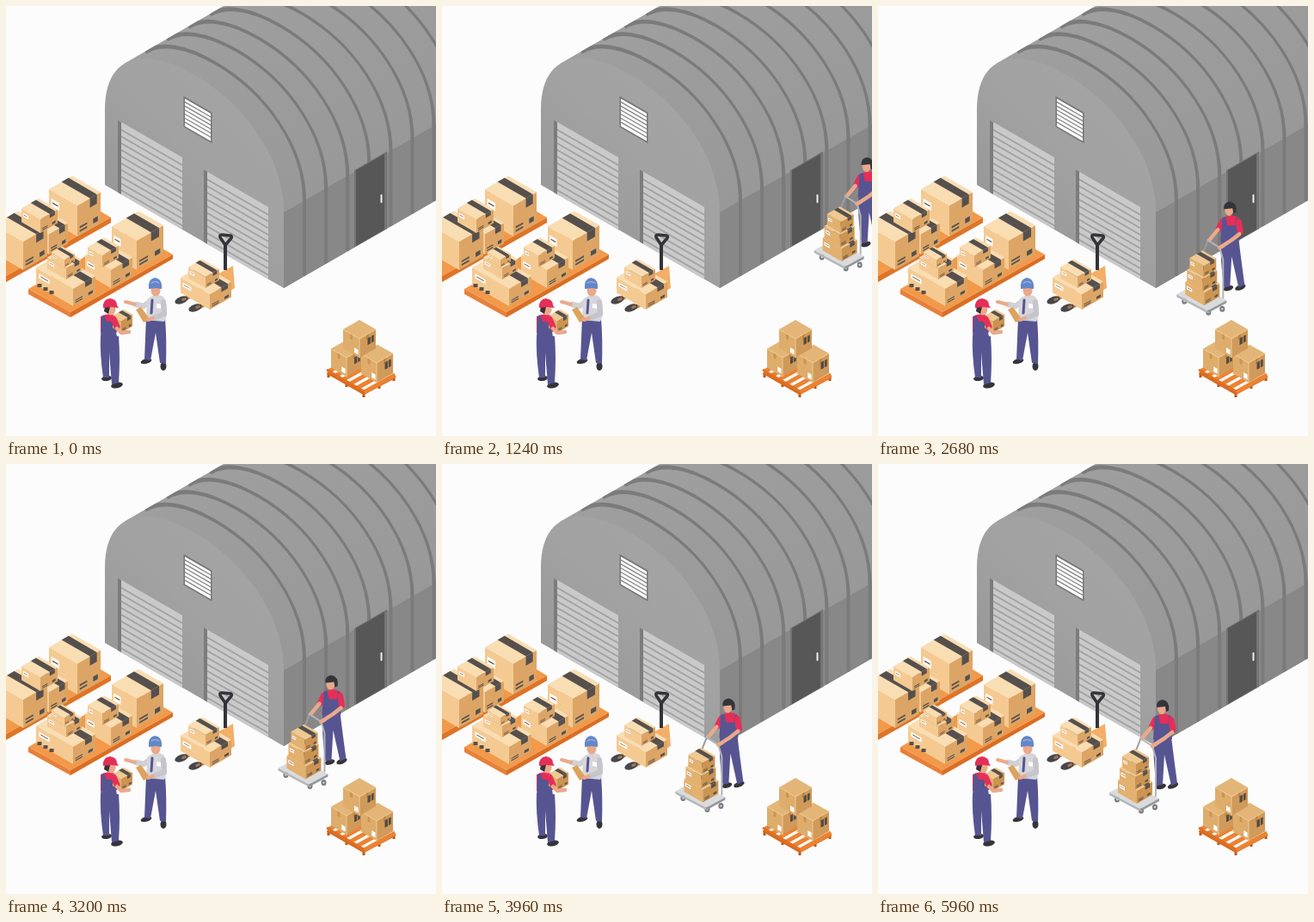
Animation, 500 px wide and 500 px high, one loop 6 s. Source, as an HTML page:

```html
<!DOCTYPE html>
<html lang="en">
<head>
<meta charset="utf-8">
<title>Warehouse</title>
<style>
html, body { margin: 0; width: 100%; height: 100%; overflow: hidden; background: #fcfcfc; }
svg { display: block; width: 100%; height: 100%; }
</style>
</head>
<body>
<svg id="stage" viewBox="0 0 500 500"></svg>
<script>
const SLOPE = 0.577;
const LOOP = 6000, TICK = 40, ARRIVE = 4000;
const KRAFT = { left: '#f4ca92', right: '#dca566', top: '#f9ddb3', tape: '#56504d' };
const TAN = { left: '#e2b06f', right: '#cb9452', top: '#eec992', tape: '#56504d' };
const BROWN = { left: '#deac6b', right: '#d09a5a', top: '#e3b678', tape: null };
const NAVY = '#565591', RED = '#e52f58', SKIN = '#eaa98b', DARK = '#35343a';

const poly = (fill, ...pts) => `<polygon fill="${fill}" points="${pts.map(p => p.join()).join(' ')}"/>`;
const shape = (fill, d) => `<path fill="${fill}" d="${d}"/>`;
const line = (color, width, d, cap = 'round') =>
  `<path fill="none" stroke="${color}" stroke-width="${width}" stroke-linecap="${cap}" stroke-linejoin="round" d="${d}"/>`;
const oval = (fill, x, y, rx, ry = rx, turn = 0) =>
  `<ellipse fill="${fill}" cx="${x}" cy="${y}" rx="${rx}" ry="${ry}" transform="rotate(${turn} ${x} ${y})"/>`;

// (x, y) is the nearest bottom corner; a runs left, b runs right, h is the height.
function box(x, y, a, b, h, c = KRAFT) {
  const at = (s, t, z) => [x - s * a + t * b, y - (s * a + t * b) * SLOPE - z * h];
  const onLeft = (fill, s0, s1, z0, z1) => poly(fill, at(s0, 0, z0), at(s1, 0, z0), at(s1, 0, z1), at(s0, 0, z1));
  const onRight = (fill, t0, t1, z0, z1) => poly(fill, at(0, t0, z0), at(0, t1, z0), at(0, t1, z1), at(0, t0, z1));
  const onTop = (fill, t0, t1) => poly(fill, at(0, t0, 1), at(1, t0, 1), at(1, t1, 1), at(0, t1, 1));
  let out = onLeft(c.left, 0, 1, 0, 1) + onRight(c.right, 0, 1, 0, 1) + onTop(c.top, 0, 1);
  if (c.tape) {
    out += onTop(c.tape, .54, .84) + onRight(c.tape, .54, .84, .7, 1)
      + onLeft('#fff', .64, .92, .48, .74) + onLeft('#6b5138', .68, .88, .6, .64)
      + onRight(c.tape, .1, .42, .1, .16) + onRight(c.tape, .1, .42, .22, .28)
      + onRight(c.tape, .68, .88, .12, .28);
  } else {
    out += onLeft('#cb9352', .42, .58, .72, 1) + onRight('#bd8443', .42, .56, .75, 1)
      + onLeft('#fff', .08, .32, .12, .38)
      + onRight('#554b40', .5, .68, .42, .78) + onRight('#554b40', .73, .88, .42, .78)
      + line('#f0c78f', 1, `M${at(1, 0, 1)}L${at(0, 0, 1)}L${at(0, 1, 1)}M${at(0, 0, 1)}L${at(0, 0, 0)}`);
  }
  return out;
}

// Front-wall coordinates: u to the right along the base, v upward (negative).
const wall = (body, shift = 0) =>
  `<g transform="matrix(1 ${SLOPE} 0 1 ${115 + shift} ${208 - shift * SLOPE})">${body}</g>`;

const ARCH_RIGHT = 'C166 -188 208 -148 208 -88V0';
const ARCH = `M0 0V-88C0 -148 42 -188 104 -188${ARCH_RIGHT}Z`;
const RIB = `M22.5 -154C41 -175.5 69 -188 104 -188${ARCH_RIGHT}`;

function shutter(u) {
  let out = shape('#c9c9c9', `M${u} 0V-84h73V0Z`);
  for (let v = -75; v < 0; v += 7.8) out += line('#a0a0a0', 2, `M${u} ${v}h73`, 'butt');
  return out + shape('#7c7c7c', `M${u - 2} 0V-84h4V0Z`);
}

function warehouse() {
  const hull = [[137.5, 67], [253, 0], [500, 0], [500, 226], [323, 328]];
  let ribs = '';
  for (let i = 0; i < 14; i++) ribs += wall(line('#7b7b7b', 4.2, RIB, 'butt'), 24 + i * 25.1);
  let vent = shape('#777', 'M91.5 -156h33v36h-33Z') + shape('#fff', 'M93 -154h30v32h-30Z');
  for (let v = -150; v < -122; v += 4.7) vent += line('#8c8c8c', 1.6, `M93 ${v}h30`, 'butt');
  return `<clipPath id="hull">${poly('#000', ...hull)}</clipPath>`
    + poly('url(#roof)', ...hull)
    + poly('#888', [323, 240], [500, 138], [500, 226], [323, 328])
    + `<g clip-path="url(#hull)">${ribs}</g>`
    + poly('#747474', [405, 191], [443, 169], [443, 259], [405, 280.5])
    + poly('#575757', [407, 191], [440, 172], [440, 260], [407, 279])
    + line('#efefef', 2, 'M436.5 220v8')
    + wall(shape('url(#front)', ARCH) + shutter(17) + shutter(117) + vent);
}

function leftPallets() {
  return poly('#f2994a', [0, 314], [122, 246], [107, 237], [0, 296])
    + poly('#df7427', [0, 314], [122, 246], [122, 252], [0, 321])
    + box(83, 268, 33, 27, 36) + box(50, 289, 30, 22, 24) + box(20, 307, 34, 28, 33) + box(40, 264, 22, 20, 16)
    + poly('#f2994a', [26, 329], [75, 356], [194, 289], [145, 261])
    + poly('#e8803a', [26, 329], [75, 356], [75, 362], [26, 335])
    + poly('#da6e24', [75, 356], [194, 289], [194, 294], [75, 362])
    + box(152, 307, 29, 31, 34) + box(122, 328, 30, 25, 21) + box(112, 304, 17, 19, 14)
    + box(78, 349, 43, 26, 20)
    + line('#56504d', 5, 'M39 323v4M46 327v4M53 331v4', 'butt')
    + box(70, 318, 22, 18, 13) + box(68, 304, 15, 12, 9);
}

function palletJack() {
  return poly('#f3ae68', [244, 313], [264, 302], [266, 328], [247, 339])
    + line('#343438', 4, 'M255 307V278', 'butt')
    + line('#343438', 3.5, 'M255 278L249 269Q248 266 251 266L261 267Q264 268 261 271Z')
    + line('#b78254', 5, 'M209 340L228 330M225 350L244 339')
    + oval('#47474b', 204, 342, 8, 4, -20) + oval('#47474b', 220, 351, 8, 4, -20)
    + oval('#a9764d', 207, 341, 3, 1.6, -20) + oval('#a9764d', 223, 350, 3, 1.6, -20)
    + box(237, 353, 34, 25, 18) + box(232, 328, 20, 16, 13);
}

function slattedPallet() {
  let out = line('#b95819', 3, 'M375 426v6M416 448v7M451 430v6M396 438v5M434 440v5', 'butt')
    + line('#d9691f', 4, 'M374 426L416 450L452 431', 'butt');
  for (let i = 0; i < 6; i++) {
    out += line('#ec8232', 5, `M${375 + i * 8.3} ${425 + i * 4.8}l36 -20`, 'butt');
  }
  return out + line('#df7125', 3, 'M373 423L416 448', 'butt')
    + box(396, 431, 18, 18, 22, BROWN) + box(431, 438, 18, 19, 23, BROWN) + box(411, 409, 19, 19, 22, BROWN);
}

function packer() {
  return oval(DARK, 117, 433, 6, 3, -8) + oval(DARK, 129, 441, 7, 3.2, -12)
    + shape(NAVY, 'M110 383L131 384Q133 410 131 438L123 440L120 403L120 432L113 432Q109 405 110 383Z')
    + shape(RED, 'M110 361Q121 355 130 362L133 374L127 381L110 380Z')
    + shape(NAVY, 'M111 362L114 359L117 367L126 367L129 385L110 388Z')
    + box(134, 380, 10, 13, 14, TAN)
    + line(RED, 7, 'M125 364L129 373') + line(SKIN, 4.5, 'M129 375L134 380L143 379')
    + oval(SKIN, 122, 353, 5.5, 6.5) + shape('#3b3035', 'M115 349L121 350L119 358L114 355Z')
    + shape(RED, 'M113 351Q112 341 121 340Q129 341 129 348L131 351L122 350Z');
}

function manager() {
  return oval(DARK, 163, 413, 6.5, 2.8, -15) + oval(DARK, 183, 419, 3.5, 5)
    + shape(NAVY, 'M163 362L185 363Q187 388 186 416L179 415L174 380L168 412L161 411Z')
    + line('#d1d1d5', 6.5, 'M168 343L160 349L151 347') + line(SKIN, 4, 'M150 347L143 345L139 344')
    + shape('#d6d6da', 'M164 341Q174 333 183 338Q188 346 187 360L184 367L163 365Z')
    + line(NAVY, 3, 'M170 342L169 357') + shape('#fff', 'M175 346l5 1v5l-5 -1Z')
    + poly('#dda35e', [151, 353], [157, 350], [167, 364], [160, 368])
    + line('#c5c5cb', 6, 'M183 344L184 358L172 363') + line(SKIN, 4, 'M171 363L165 365')
    + oval(SKIN, 174, 331, 5.5, 6.5)
    + shape('#6487c9', 'M166 329Q165 317 173 316Q182 317 181 329L174 328Z')
    + line('#aec1e6', 1, 'M169 322Q173 319 178 322');
}

function porter() {
  return oval(DARK, 329, 375, 6, 3, -15) + oval(DARK, 343, 374, 6.5, 3, -22)
    + shape(NAVY, 'M321 315L341 317Q344 342 348 371L341 374L333 338L331 373L324 374Q319 340 321 315Z')
    + line('#9b9ca2', 2, 'M306 318L296 343V372')
    + line(RED, 7, 'M322 298L318 306') + line(SKIN, 4.5, 'M317 307L307 319')
    + shape(RED, 'M320 295Q332 287 341 293L345 304L341 318L321 317Z')
    + shape(NAVY, 'M322 293L326 292L328 302L337 302L338 293L341 294L342 320L320 320Z')
    + line(RED, 7, 'M341 298L343 309') + line(SKIN, 4.5, 'M342 312L333 319L319 328')
    + oval(SKIN, 330, 284, 5, 7) + shape(DARK, 'M324 283Q323 275 331 274Q340 276 338 287L335 288L334 282Z');
}

function cart() {
  const wheel = (x, y) => oval('#777a80', x, y, 3, 3.5) + oval('#d5d7da', x, y, 1.2);
  return wheel(278, 390) + wheel(306, 403) + wheel(322, 399)
    + poly('#d9dbdd', [269, 382], [305, 401], [327, 389], [291, 370])
    + poly('#b5b7ba', [269, 382], [305, 401], [305, 404], [269, 385])
    + poly('#94969a', [305, 401], [327, 389], [327, 392], [305, 404])
    + box(301, 395, 22, 18, 15, TAN) + box(299, 379, 18, 17, 15, TAN) + box(300, 362, 16, 15, 13, TAN)
    + line('#b2b4b9', 2, 'M305 319L319 328L323 342V386') + line(SKIN, 4, 'M323 326L319 328');
}

const stage = document.getElementById('stage');
stage.innerHTML = `<defs>
  <linearGradient id="roof" x1="0" y1="0" x2=".6" y2="1">
    <stop offset="0" stop-color="#a0a0a0"/><stop offset="1" stop-color="#969696"/></linearGradient>
  <linearGradient id="front" x1=".1" y1="1" x2=".55" y2="0">
    <stop offset="0" stop-color="#999"/><stop offset=".6" stop-color="#a2a2a2"/><stop offset="1" stop-color="#a3a3a3"/></linearGradient>
  </defs>
  <rect width="500" height="500" fill="#fcfcfc"/>
  ${warehouse()}${leftPallets()}${palletJack()}${manager()}${packer()}${slattedPallet()}
  <g id="delivery">${porter()}${cart()}</g>`;
const delivery = document.getElementById('delivery');

function draw(ms) {
  const t = Math.floor(ms % LOOP / TICK) * TICK;
  const left = Math.max(0, ARRIVE - t);
  delivery.setAttribute('transform', `translate(${left * .0593} ${left * -.0355})`);
}

const start = performance.now();
function tick() {
  draw(performance.now() - start);
  requestAnimationFrame(tick);
}
draw(0);
requestAnimationFrame(tick);
</script>
</body>
</html>
```
